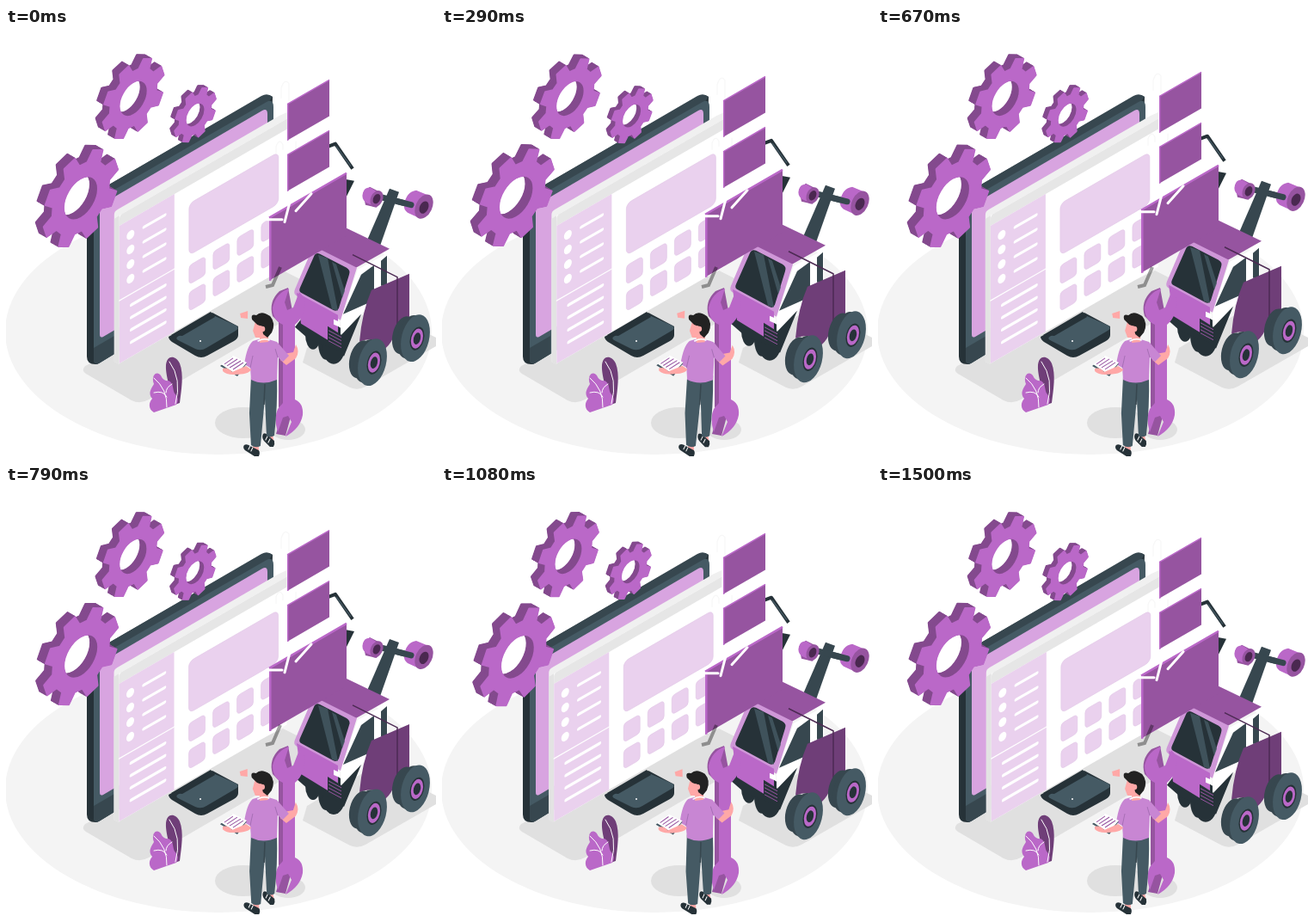
These frames come from a looping animation (500 by 500 pixels, 1540 ms). An HTML page:

```html
<!DOCTYPE html>
<html lang="en">
<head>
<meta charset="utf-8">
<title>Workshop scene</title>
<style>
html, body { margin: 0; width: 100%; height: 100%; overflow: hidden; background: #fff; }
svg { display: block; width: 100%; height: 100%; }
.p { fill: #ba68c8; } .m { fill: #9654a0; } .d { fill: #6f3e78; }
.s { fill: #37474f; } .b { fill: #455a64; } .k { fill: #263238; }
.l { fill: #ead1ee; } .h { fill: #e0e0e0; } .f { fill: #ffa8a7; } .w { fill: #fff; }
.line { fill: none; stroke: #fff; stroke-linecap: round; }
</style>
</head>
<body>
<svg viewBox="0 0 500 500">
  <ellipse cx="247" cy="353" rx="248" ry="143" fill="#f4f4f4"/>
  <g class="h">
    <path d="M92 393Q87 398 93 402L146 433Q156 438 166 432L350 325V296L322 282Z"/>
    <ellipse cx="276" cy="459" rx="33" ry="18"/>
    <ellipse cx="328" cy="467" rx="20" ry="12"/>
    <path d="M345 389L400 418Q409 422 418 417L500 370V360L430 325L350 372Z"/>
  </g>

  <g id="monitor">
    <path class="k" d="M94 205Q94 197 101 193L297 80Q304 76 310 80L304 270L106 391Q94 392 94 382Z"/>
    <path class="s" d="M101 193L297 79Q304 75 310 80L304 88L106 202Z"/>
    <path class="b" d="M102 208Q102 202 107 199L303 86Q311 82 311 92V272L126 379L108 390Q102 392 102 385Z"/>
    <path class="s" d="M102 372L126 358V379L108 390Q102 392 102 385Z"/>
    <path fill="#d8a4e0" d="M109 212Q109 207 113 204L298 96Q304 93 304 100V247L113 359Q109 361 109 356Z"/>
    <path class="k" d="M189 359L240 331L270 347V357Q270 361 265 364L234 381Q227 385 220 381L193 365Q189 362 189 359Z"/>
    <path class="b" d="M201 358L243 335L268 346Q272 349 267 352L233 372Q227 376 220 373L202 364Q195 361 201 358Z"/>
    <path class="k" d="M192 357L238 330L243 336L205 358Z"/>
    <circle class="w" cx="226" cy="364" r="1"/>
  </g>

  <g id="page">
    <path fill="#f0f0f0" d="M126 217Q126 213 130 211L318 102L327 98V110L132 224V391L126 388Z"/>
    <path fill="#e3e3e3" d="M126 222L132 218V391L126 388Z"/>
    <g id="sheet" transform="matrix(1 -.577 0 1 132 218)">
      <path class="w" d="M0 0H195V172H0Z"/>
      <path fill="#e6e6e6" d="M0 3Q0 0 3 0H195V12H0Z"/>
      <path class="l" d="M0 12H64V172H0Z"/>
      <path class="line" d="M0 99H64" stroke-width="1.3"/>
      <rect class="l" x="81" y="33" width="104" height="60" rx="6" stroke="#dfc3e4" stroke-width=".5"/>
    </g>
  </g>

  <g id="gears"></g>

  <g id="plant">
    <path class="d" d="M187 441C196 425 185 408 186 392C187 380 197 380 202 390C207 403 204 420 202 436Z"/>
    <path class="p" d="M172 447C165 443 166 435 170 431C164 424 170 418 172 414C168 403 176 398 180 404Q183 411 189 410C196 413 193 422 197 426Q202 432 198 438Z"/>
    <path class="line" stroke-width="1" d="M190 388Q205 408 197 437M172 407Q188 420 187 441M172 424Q183 421 187 429M193 414Q186 418 186 424"/>
  </g>

  <g id="loader">
    <g fill="none" stroke="#263238" stroke-linejoin="round">
      <path d="M375 138L383 135L403 164" stroke-width="4"/>
      <path d="M384 138L401 161" stroke="#455a64" stroke-width="1.3"/>
    </g>
    <path class="k" d="M394 176L405 178L394 200Z"/>
    <path class="s" d="M416 256L446 187L457 191L432 262Z"/>
    <path d="M432 196L471 206" stroke="#37474f" stroke-width="7" stroke-linecap="round"/>
    <path class="m" d="M415 192L423 185L437 192L431 209L418 206Z"/>
    <path class="p" d="M415 192Q417 185 424 186L435 193L427 207L418 203Q413 198 415 192Z"/>
    <ellipse class="m" cx="431" cy="199" rx="7" ry="10" transform="rotate(25 431 199)"/>
    <ellipse cx="431" cy="199" rx="4" ry="6" fill="#4a2850" transform="rotate(25 431 199)"/>
    <path class="p" d="M463 206Q465 191 477 189L494 196L480 221L467 215Q462 211 463 206Z"/>
    <ellipse class="m" cx="486" cy="208" rx="9.500" ry="15" transform="rotate(25 486 208)"/>
    <ellipse cx="486" cy="209" rx="5" ry="7.500" fill="#4a2850" transform="rotate(25 486 209)"/>
    <path d="M455 202L471 206" stroke="#37474f" stroke-width="7" stroke-linecap="round"/>

    <g class="k">
      <ellipse cx="357" cy="357" rx="9" ry="17"/>
      <ellipse cx="372" cy="366" rx="9" ry="20"/>
      <ellipse cx="381" cy="368" rx="14" ry="23"/>
      <path d="M336 348L346 335L392 356V378L352 362Z"/>
    </g>
    <path class="w" d="M389 338L409 281L444 262V300L425 322L405 340L389 362Z"/>
    <path class="s" d="M392 333L413 287L428 276V317ZM436 271L443 265V300H436Z"/>
    <path class="m" d="M364 259L396 233L446 257L407 279Z"/>
    <path fill="#cf97d8" d="M364 257L408 279L389 340L337 311Q334 309 336 304L353 264Z"/>
    <path class="p" d="M338 308L386 334V358L374 363L343 344Z"/>
    <path class="k" d="M358 266Q360 261 365 263L396 279Q401 282 399 287L387 326Q385 331 380 328L343 308Q340 306 342 302Z"/>
    <path class="b" d="M363 264L374 268L386 329L379 327ZM379 272L384 275L394 306L391 314Z" opacity=".8"/>
    <path class="w" d="M381 339L388 342V348L381 345Z"/>
    <path class="k" d="M374 347L390 357L413 333L393 382L374 366Z"/>
    <path d="M375 352L390 360M375 356L390 364M375 360L390 368M375 364L390 372" stroke="#9654a0"/>
    <path class="d" d="M411 365Q414 330 425 305L469 286V338L452 355Q449 366 441 373Q432 357 411 365Z"/>
    <path d="M403 264L455 290V356" fill="none" stroke="#4c2a53" stroke-width="1.5"/>
    <g id="wheels"></g>

    <g fill="none" stroke="#f7f7f7" stroke-width="1.200">
      <path d="M320 82V70Q324 58 329 65V85M314 146V138Q318 128 322 136V142M337 132V145"/>
    </g>
    <g id="boards"></g>
    <path class="line" stroke-width="3" stroke-linecap="butt" d="M303 223H321M324 226L331 199M337 213L355 193"/>
  </g>
  <path d="M302 301L310 299L319 278" fill="none" stroke="#a2a2a2" stroke-width="4" style="mix-blend-mode:multiply"/>

  <g id="wrench">
    <path class="m" d="M317 342L310 335Q305 318 318 306L328 302L336 345V434L325 474L314 472L320 452L317 440Z"/>
    <path class="p" d="M329 303L324 319L327 328L334 325L341 307L347 314Q349 334 336 345V432Q346 436 345 450Q342 466 325 475L332 458L328 451L322 453L316 470Q311 453 316 443L322 436V345Q310 340 310 325Q314 308 329 303Z"/>
  </g>

  <g id="man">
    <path class="f" d="M272 332L281 329V338L273 337Z"/>
    <path class="f" d="M287 484H294V493H287ZM304 472H310L312 484H305Z"/>
    <g fill="#263238">
      <path d="M277 485Q280 483 284 486L294 491Q296 494 294 498H289L278 491Q275 488 277 485Z"/>
      <path d="M299 472Q302 470 305 474L312 480Q313 484 311 487H307L300 480Q297 476 299 472Z"/>
    </g>
    <path class="line" stroke-width="1" d="M282 490L284 486M285 492L287 488M302 479L304 475M305 482L307 478"/>
    <path class="b" d="M285 405L315 404Q316 440 312 474Q308 477 303 474L301 431L296 486Q290 489 285 485L283 448Z"/>
    <path d="M301 414L300 438" stroke="#37474f" stroke-width="1.500"/>
    <path class="f" d="M323 379L334 377L337 368Q342 376 337 384L326 392L319 386Z"/>
    <path fill="#c886d3" d="M287 364Q300 359 315 365Q322 373 329 381L322 388L316 383L315 409Q299 416 285 409L284 395L277 391Q280 370 287 364Z"/>
    <path d="M316 383L313 373M284 395L287 381" stroke="#a66fb5" fill="none"/>
    <path d="M249 393L263 382L280 390L269 405Z" fill="#455a64"/>
    <path class="w" d="M250 391L264 381L280 389L268 403Z"/>
    <path d="M254 391L264 384M257 393L269 385M260 395L273 387M264 397L276 389" stroke="#9654a0"/>
    <path class="f" d="M252 396Q258 394 263 400L279 393L285 397Q283 403 264 403Q256 403 252 399Z"/>
    <path class="f" d="M290 341L287 352L290 360L295 360V366L305 365V345Z"/>
    <path d="M286 339Q284 332 291 334Q297 328 307 335Q314 343 309 354L304 360L299 356L297 346Q293 347 290 343Z" fill="#222"/>
    <circle class="f" cx="298" cy="350" r="3.200"/>
    <path class="line" stroke-width="1.500" d="M293 364Q300 360 306 363"/>
  </g>
</svg>
<script>
const $ = id => document.getElementById(id);
const add = (id, markup) => $(id).insertAdjacentHTML('beforeend', markup);

// Isometric cogwheel: eight teeth around a round hole, extruded up and to the left
function gear(x, y, r, hole, depth) {
  const at = (a, q) => `${(q * Math.cos(a)).toFixed(1)} ${(q * Math.sin(a)).toFixed(1)}`;
  const points = [];
  for (let i = 0; i < 8; i++) {
    const a = i * Math.PI / 4 + .475;
    points.push(at(a - .26, r * .76), at(a - .15, r), at(a + .15, r), at(a + .26, r * .76));
  }
  const d = `M${points.join('L')}ZM${hole} 0A${hole} ${hole} 0 1 0 ${-hole} 0A${hole} ${hole} 0 1 0 ${hole} 0Z`;
  for (let k = depth; k >= 0; k -= .5) {
    const color = k ? '#844a8e' : '#ba68c8';
    add('gears', `<path d="${d}" transform="matrix(.866 -.5 0 1 ${x - k} ${y - k * .577})" fill="${color}"
      fill-rule="evenodd" stroke="${color}" stroke-width="2" stroke-linejoin="round"/>`);
  }
}
gear(148, 82, 41.5, 19, 8);
gear(220, 101, 28, 13, 5);
gear(87, 198, 50.5, 23, 9);

for (const y of [30, 47, 64, 81])
  add('sheet', `<ellipse class="w" cx="13" cy="${y}" rx="4.500" ry="5"/>
    <path class="line" d="M28.500 ${y}H53" stroke-width="3.500"/>`);
for (const y of [112, 126.4, 140.8, 155.2])
  add('sheet', `<path class="line" d="M14 ${y}H53" stroke-width="3.800"/>`);
for (const x of [81, 109, 137, 165]) for (const y of [105, 136])
  add('sheet', `<rect class="l" x="${x}" y="${y}" width="19" height="22" rx="4" stroke="#dfc3e4" stroke-width=".5"/>`);

function wheel(x, y, rx, ry) {
  const oval = (cls, dx, k) =>
    `<ellipse class="${cls}" cx="${x + dx}" cy="${y}" rx="${rx * k}" ry="${ry * k}" transform="rotate(14 ${x} ${y})"/>`;
  add('wheels', oval('s', -14, .8) + oval('s', -6, .92) + oval('b', 0, 1) +
    oval('k', 2, .5) + oval('p', 2, .42) + oval('k', 2, .25));
}
wheel(476, 361, 16, 28);
wheel(426, 389, 16, 28);

function board(x, y, w, h, edge) {
  const slope = y => `M${x} ${y}l${w} ${-w * .577}`;
  add('boards', `<path class="m" d="${slope(y)}v${h}L${x} ${y + h}Z"/>
    <path d="${slope(y)}M${x + edge / 2} ${y}v${h}" fill="none" stroke="#ba68c8" stroke-width="${edge}"/>`);
}
board(327, 89, 49, 42, 1.5);
board(327, 148, 49, 42, 1.5);
board(306, 221, 90, 73, 2.5);

// Linear interpolation through evenly spaced stops
function stops(values, p) {
  const q = p * (values.length - 1), i = Math.floor(q);
  return values[i] + (values[i + 1] - values[i]) * (q - i);
}
const shake = [0, -1, 2, -4, 4, -4, 4, -4, 2, -1, 0];

function draw(now) {
  const p = ((now % 1540 + 25) % 1500) / 1500;
  const tilt = stops([0, 1, 0, -1, 0], p);
  $('loader').setAttribute('transform', `translate(0 ${stops([0, -10, 0], p)})`);
  $('page').setAttribute('transform', `translate(${stops(shake, p)} 0)`);
  $('gears').setAttribute('transform', `rotate(${tilt} 140 144)`);
  $('man').setAttribute('transform', `rotate(${tilt} 294 415)`);
}
const start = performance.now();
function tick() {
  draw(performance.now() - start);
  requestAnimationFrame(tick);
}
tick();
</script>
</body>
</html>
```
